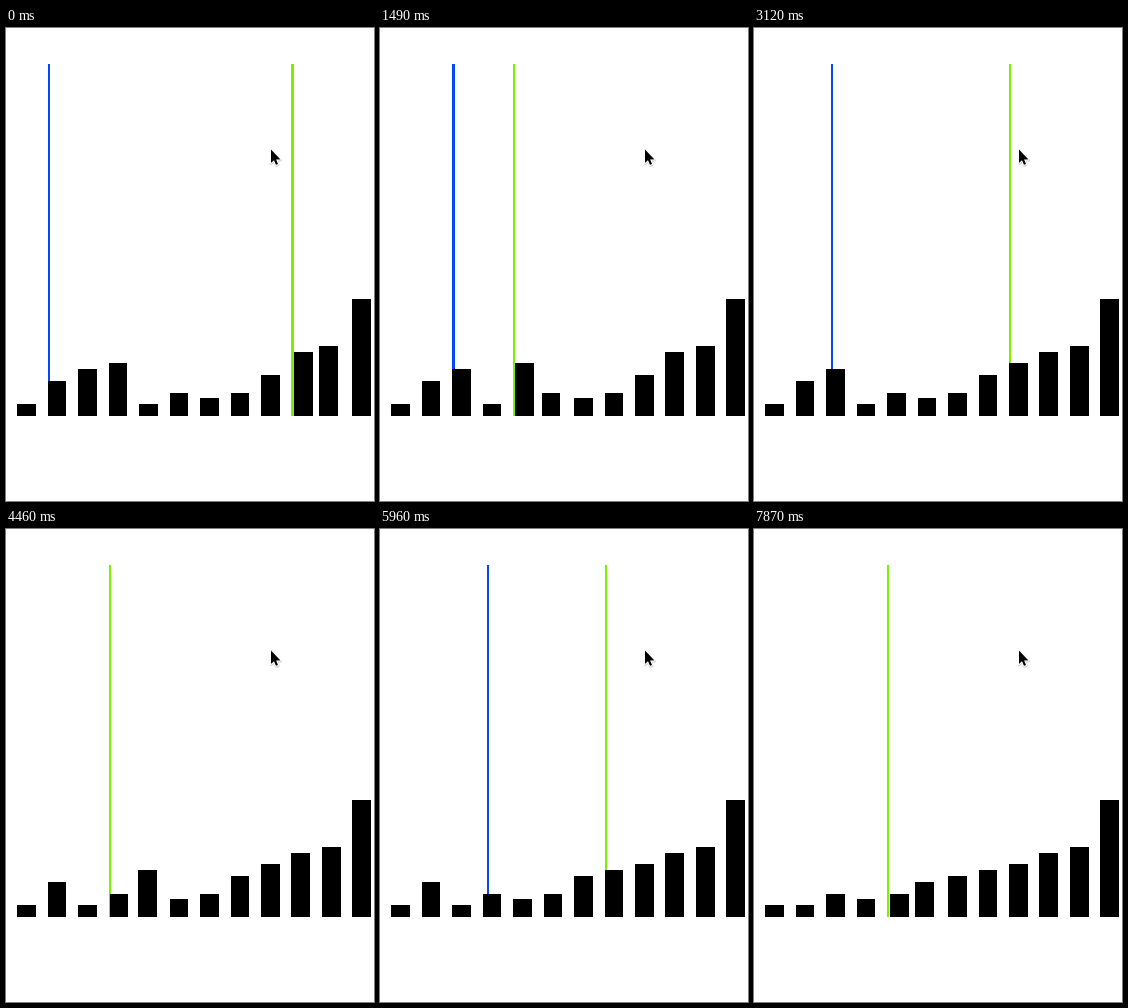
Animation of 368x473 px, one loop 8 s. Source, as a matplotlib script:

```python
import math

import matplotlib.pyplot as plt
import numpy as np
from matplotlib.animation import FuncAnimation
from matplotlib.patches import Polygon, Rectangle

W, H, DPI = 368, 473, 64
FRAMES, INTERVAL = 400, 20

# Chart layout in pixels
LEFT, TOP, BASE = 11.35, 36, 388
PITCH, BAR_W, LINE_W, UNIT = 30.45, 18.67, 2.3, 5.86

# The picture refreshes in ticks; the sort is always part-way through a step.
TICK_MS, TICK_PHASE = 148.7, 0.09
FIRST_STEP, STEPS_PER_TICK = 0.81, 0.7358

VALUES = [2, 6, 8, 9, 2, 4, 3, 4, 7, 12, 11, 20]
COUNT = len(VALUES)


def sort_states():
    """Bubble sort from the end of pass 1: slots of all bars, then both markers."""
    order = list(range(COUNT))
    blue, green = 1, 9
    states = []

    def record():
        slots = [order.index(b) for b in range(COUNT)]
        states.append(np.array(slots + [blue, green], float))

    record()
    for done in range(1, 5):
        for j in range(green, COUNT - 1 - done):
            if j != green:
                green = j
                record()
            if VALUES[order[j]] > VALUES[order[j + 1]]:
                order[j], order[j + 1] = order[j + 1], order[j]
                record()
        blue += 1
        record()
        green = 0
        record()
    return states


def swing(p):
    return 0.5 - 0.5 * math.cos(math.pi * p)


def pixel(v):
    return math.floor(v + 0.5)


STATES = sort_states()

fig = plt.figure(figsize=(W / DPI, H / DPI), dpi=DPI, facecolor="white")
ax = fig.add_axes([0, 0, 1, 1])
ax.set_xlim(0, W)
ax.set_ylim(H, 0)
ax.axis("off")


def block(top, color, z):
    top = pixel(top)
    rect = Rectangle((0, top), 1, BASE - top, facecolor=color,
                     linewidth=0, zorder=z)
    return ax.add_patch(rect)


bars = [block(BASE - v * UNIT, "black", 3) for v in VALUES]
markers = [block(TOP, "#0048fa", 1), block(TOP, "#7cf000", 2)]
movers = bars + markers
widths = [BAR_W] * COUNT + [LINE_W] * 2

# Mouse pointer with a white rim and a faint shadow
arrow = np.array([(0, -0.5), (0, 12.9), (3, 10.2), (5, 14.8), (7, 14),
                  (5.1, 9.5), (9.4, 9.4)])
for dx, dy, color, rim, z in [(0.3, 0.9, "#d4d4d4", 2.6, 5),
                              (0, 0, "white", 2.0, 6),
                              (0, 0, "black", 0, 7)]:
    ax.add_patch(Polygon(arrow + (265 + dx, 122 + dy), facecolor=color,
                         edgecolor=color, linewidth=rim * 72 / DPI,
                         joinstyle="round", zorder=z))


def draw(frame):
    t = (frame + 0.5) * INTERVAL
    tick = int(t / TICK_MS + TICK_PHASE)
    step, part = divmod(FIRST_STEP + STEPS_PER_TICK * tick, 1)
    a, b = STATES[int(step)], STATES[int(step) + 1]
    for rect, slot, width in zip(movers, a + (b - a) * swing(part), widths):
        x = LEFT + slot * PITCH
        rect.set_x(pixel(x))
        rect.set_width(pixel(x + width) - pixel(x))
    return movers


anim = FuncAnimation(fig, draw, frames=FRAMES, interval=INTERVAL,
                     init_func=lambda: draw(0), repeat=True, repeat_delay=0,
                     cache_frame_data=False)
plt.show()
```
